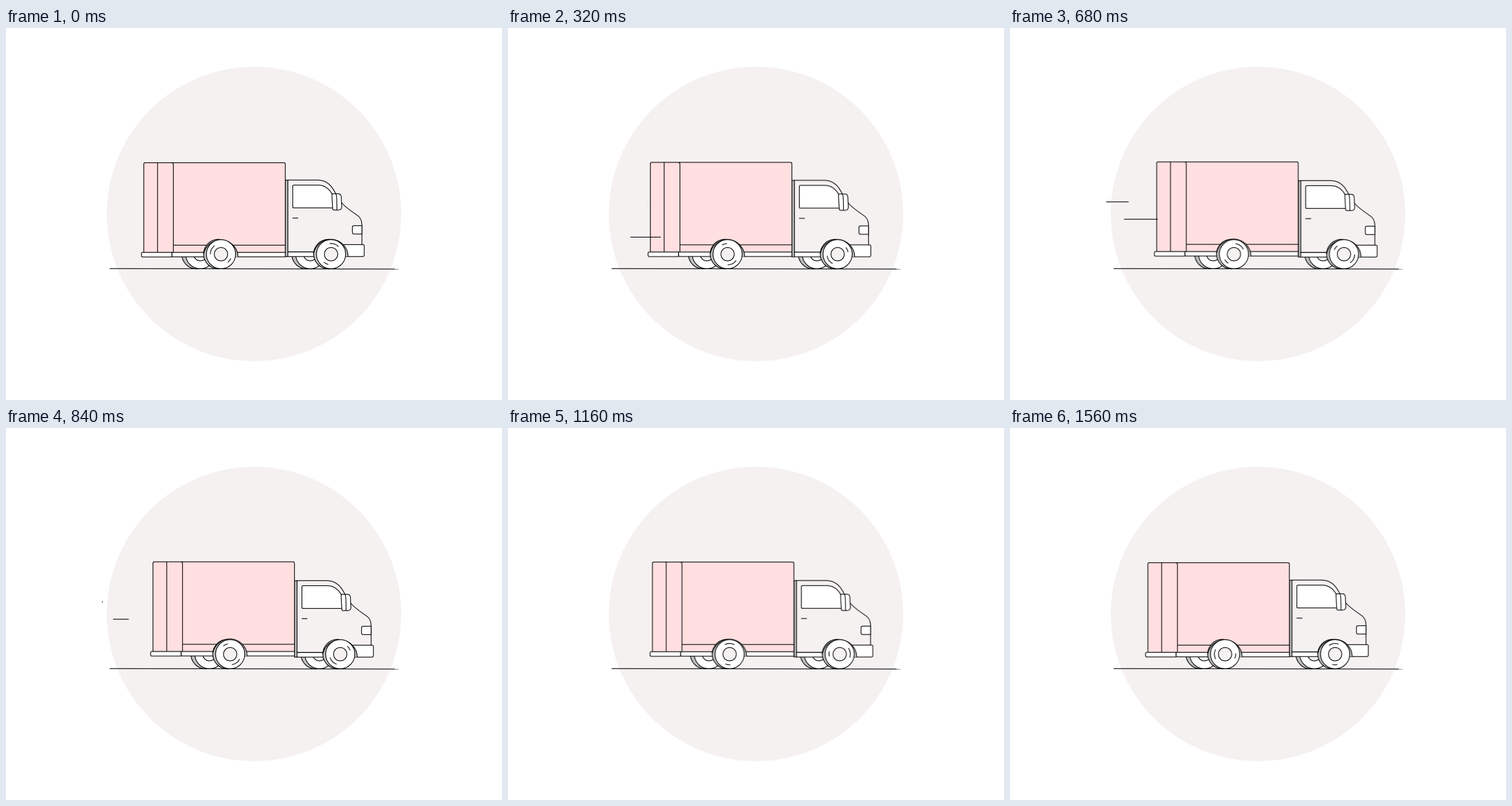
Recreate the animation shown at these times as an HTML page. Size 864x648 px, loop 1600 ms.

```html
<!DOCTYPE html>
<html lang="en">
<head>
<meta charset="utf-8">
<title>Delivery truck</title>
<style>
  @property --head { syntax: "<number>"; inherits: false; initial-value: 0; }
  @property --tail { syntax: "<number>"; inherits: false; initial-value: 0; }

  html, body { margin: 0; width: 100%; height: 100%; overflow: hidden; background: #fff; }
  svg { display: block; width: 100vw; height: 100vh; }

  .ink { fill: none; stroke: #000; stroke-width: 1.25; stroke-linejoin: round; }
  .white { fill: #fff; }
  .pale { fill: #f5f1f1; }
  .pink { fill: #ffdfe0; }
  .gray { fill: #bfbfbf; }

  .drive { animation: drive 1.6s infinite; }
  .box { animation: lift 1.6s infinite; }
  .cab { animation: dip 1.6s infinite; }
  .spin { animation: spin 1.6s linear infinite; }

  /* Speed lines: the head runs left, the tail follows. */
  .streak {
    stroke-dasharray: 0 calc(var(--tail) * 1px) calc((var(--head) - var(--tail)) * 1px) 200px;
    animation: head 1.6s var(--d) infinite, tail 1.6s var(--d) infinite;
  }

  @keyframes drive {
    0% { transform: none; animation-timing-function: cubic-bezier(.27, 0, .47, 1); }
    50% { transform: translateX(16px); animation-timing-function: cubic-bezier(.53, 0, .73, 1); }
    100% { transform: none; }
  }
  @keyframes lift {
    0%, 100% { transform: none; animation-timing-function: cubic-bezier(.3, .2, .6, 1); }
    56% { transform: translateY(-1.6px); animation-timing-function: cubic-bezier(.4, 0, .7, .8); }
  }
  @keyframes dip {
    0%, 100% { transform: none; animation-timing-function: cubic-bezier(.3, .2, .6, 1); }
    56% { transform: translateY(1px); animation-timing-function: cubic-bezier(.4, 0, .7, .8); }
  }
  @keyframes spin { to { transform: rotate(1080deg); } }
  @keyframes head {
    0% { --head: 0; animation-timing-function: cubic-bezier(.39, .575, .565, 1); }
    25%, 100% { --head: 77; }
  }
  @keyframes tail {
    0%, 10.6% { --tail: 0; animation-timing-function: cubic-bezier(.37, 0, .63, 1); }
    35%, 100% { --tail: 77; }
  }
</style>
</head>
<body>
<svg viewBox="0 0 864 648">
  <defs>
    <circle id="tyre" class="gray" cx="-4.6" cy="-.2" r="25.7"/>
    <g id="wheel">
      <circle class="white" r="25.4"/>
      <circle class="pale" r="11.6"/>
    </g>
    <g id="fender">
      <path class="gray" stroke="none" d="M-30.3 0A30.2 30.2 0 0 1 29.7 4.6Z"/>
      <path d="M-30.3 0A30.2 30.2 0 0 1 29.7 4.6"/>
    </g>
    <g id="far">
      <circle class="gray" cx="-6.6" cy="-.2" r="25.7"/>
      <use href="#wheel"/>
    </g>
    <path id="tread" d="M16.6 -8.4A18.6 18.6 0 0 1 16.6 8.4M-18.5 1.3A18.6 18.6 0 0 1 -17 -7.6"/>
  </defs>

  <circle class="pale" cx="432" cy="324" r="256.5"/>

  <g class="ink">
    <g class="drive">
      <use href="#far" x="338.4" y="394"/>
      <use href="#far" x="530" y="394"/>

      <g class="cab">
        <path class="gray" d="M486.5 265H491.5V398H486.5Z"/>
        <path class="pale" d="M491 264.8H543C559 264.8 568 275 575 290C583 306 594 314 610 325C617 329 620 334 620 343V390H491Z"/>
        <path class="white" d="M491 390H550V398H491Z"/>
        <path class="white" d="M501.5 273.5H543C557 273.5 564 281 569 291L573 313.4H501.5Q499.5 313.4 499.5 311.4V275.5Q499.5 273.5 501.5 273.5Z"/>
        <path class="white" d="M570 288.6H579Q583.6 289 584 294L584.8 312Q584.6 316.6 580 317H571.5Q569.3 317 569 314.6L567.7 291Q567.7 288.6 570 288.6Z"/>
        <path d="M574.6 288.6Q576.6 292 576.4 317M499 331.2H509"/>
        <path class="white" d="M620 344.3H606Q603.4 344.3 603.4 347V356Q603.4 358.8 606 358.8H620Z"/>
        <path class="white" d="M585 377.4H622Q624 377.4 624 379.4V395.5Q624 398 621.5 398H585Z"/>
      </g>

      <g class="box">
        <path class="pink" d="M240 391V237Q240 234.5 242.5 234.5H484Q486.5 234.5 486.5 237V391Z"/>
        <path d="M264 234.5V391M288.5 234.5Q291.5 234.5 291.5 237.5V391M291.5 378.4H486.5"/>
        <path class="white" d="M289 390.8H486.5V398.6H291Q289 398.6 289 396.6Z"/>
        <path class="white" d="M289 390.8H238Q236 390.8 236 392.8V396.8Q236 398.8 238 398.8H289Z"/>
      </g>

      <use href="#tyre" x="374.5" y="394"/>
      <use href="#tyre" x="566.2" y="394"/>
      <g class="box"><use href="#fender" x="374.5" y="394.4"/></g>
      <g class="cab"><use href="#fender" x="566.2" y="393.4"/></g>
      <use href="#wheel" x="374.5" y="394"/>
      <use href="#wheel" x="566.2" y="394"/>
      <g transform="translate(374.5 394) rotate(206)"><use class="spin" href="#tread"/></g>
      <g transform="translate(566.2 394) rotate(288)"><use class="spin" href="#tread"/></g>
    </g>

    <path d="M180.5 419.2L683.5 419.8"/>
    <path class="streak" style="--d: .135s" d="M266.5 364.4h-77"/>
    <path class="streak" style="--d: .32s" d="M244 302.8h-77"/>
    <path class="streak" style="--d: .44s" d="M263.5 333.2h-77"/>
  </g>
</svg>
</body>
</html>
```
